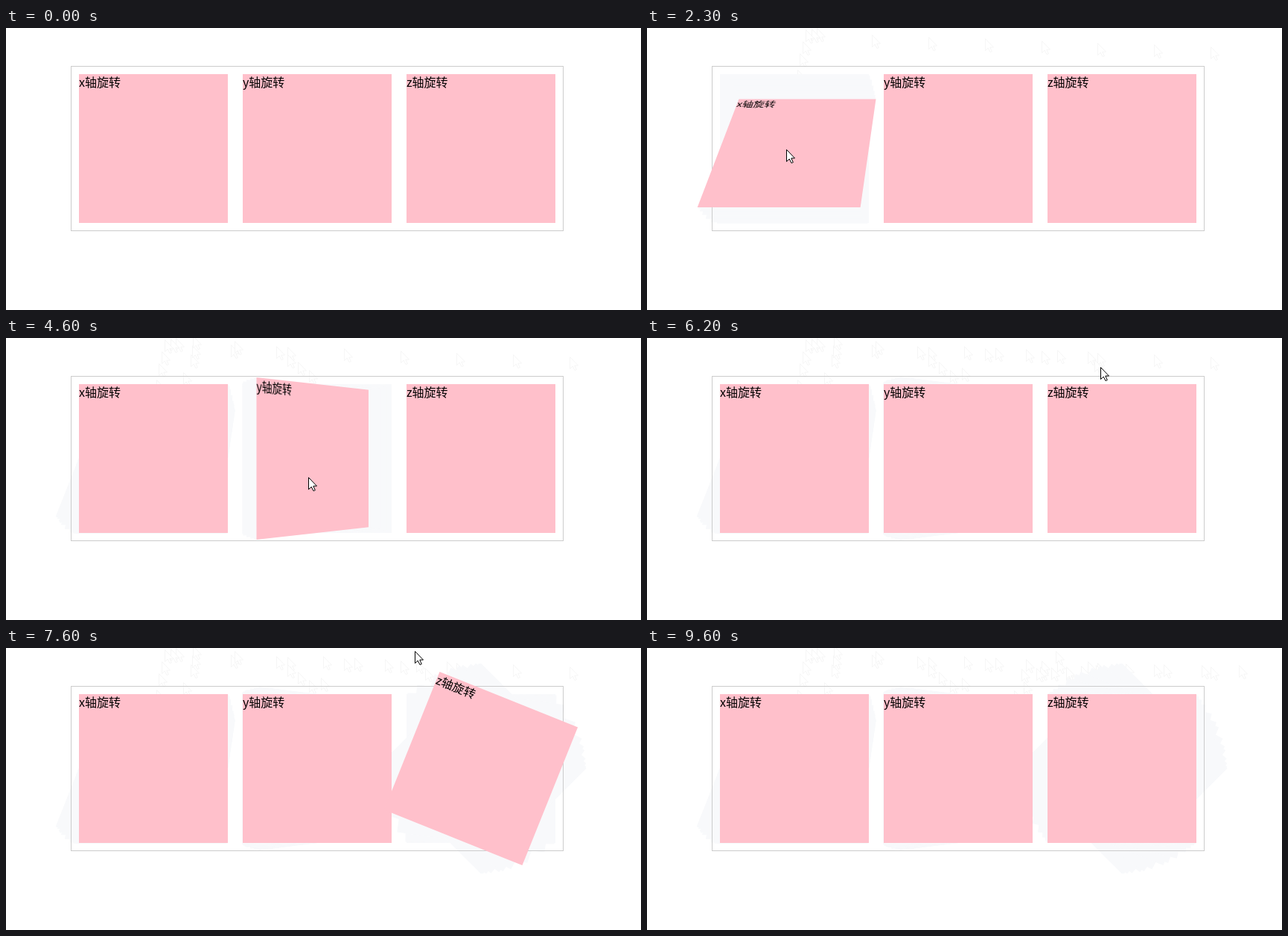
These frames come from a looping animation (853 by 379 pixels, 9900 ms). An HTML page:

```html
<!DOCTYPE html>
<html lang="zh-CN">
<head>
<meta charset="utf-8">
<title>3D rotation</title>
<style>
  html, body { margin: 0; width: 100%; height: 100%; overflow: hidden; background: #fff; }
  #stage { position: relative; width: 853px; height: 379px; overflow: hidden; }
  .box {
    position: absolute; left: 87px; top: 51px; width: 660px; height: 220px;
    border: 1px solid transparent; perspective: 800px;
  }
  #panels { border-color: #ccc; }
  .panel {
    position: absolute; top: 10px; width: 200px; height: 200px; background: pink;
    font: 16px/20px "Noto Sans CJK SC", "Noto Sans CJK", sans-serif; color: #000;
  }
  .faint { background: #f8f9fb; }
  .arrow { position: absolute; left: 0; top: 0; width: 12px; height: 19px; overflow: visible; }
  .arrow path { fill: #fff; stroke: #000; }
  .arrow.faint { background: none; }
  .arrow.faint path { stroke: #f6f6f6; }
</style>
</head>
<body>
<div id="stage">
  <div id="arrows"></div>
  <div id="shades" class="box"></div>
  <div id="panels" class="box"></div>
</div>
<script>
const LOOP = 9900, STEP = 100, TURN = 900, ANGLE = 45;
const SHOW = 300, HIDE = 9600;

// hover intervals [enter, leave] per axis
const axes = [
  { name: 'x', hovers: [[1590, 2870]] },
  { name: 'y', hovers: [[4000, 5330], [7880, 8400]] },
  { name: 'z', hovers: [[6270, 7330]] }
];

// turning points of the pointer: [time, x, y]
const path = [
  [SHOW, 757, 25], [900, 302, 9], [1000, 228, 0], [1200, 213, 2], [1400, 205, 34],
  [2000, 187, 163], [2600, 187, 163],
  [3200, 248, 22], [3400, 251, -3], [3600, 363, 11], [3900, 407, 43],
  [4500, 406, 187], [5000, 406, 187],
  [5600, 426, 11], [6000, 592, 18], [6200, 609, 39],
  [6600, 620, 120], [7100, 618, 120],
  [7600, 549, 4], [7900, 485, 66], [8300, 482, 85],
  [8500, 503, 28], [9200, 643, 21], [HIDE, 846, 24]
];

const $ = id => document.getElementById(id);

// CSS "ease": cubic-bezier(.25, .1, .25, 1)
function ease(x) {
  if (x <= 0) return 0;
  if (x >= 1) return 1;
  const curve = (u, a, b) => 3 * u * (1 - u) * (1 - u) * a + 3 * u * u * (1 - u) * b + u * u * u;
  let lo = 0, hi = 1;
  for (let i = 0; i < 24; i++) {
    const mid = (lo + hi) / 2;
    if (curve(mid, .25, .25) < x) lo = mid; else hi = mid;
  }
  return curve(lo, .1, 1);
}

// a turn cut short also takes less time to go back
function angleAt(axis, t) {
  const hover = axis.hovers.filter(h => h[0] <= t).pop();
  if (!hover) return 0;
  const [enter, leave] = hover;
  if (t < leave) return ANGLE * ease((t - enter) / TURN);
  const peak = ease((leave - enter) / TURN);
  return ANGLE * peak * (1 - ease((t - leave) / (TURN * peak)));
}

function pointerAt(t) {
  const i = Math.max(1, path.findIndex(p => p[0] >= t));
  const [t0, x0, y0] = path[i - 1], [t1, x1, y1] = path[i];
  const k = (t - t0) / (t1 - t0);
  return [Math.round(x0 + (x1 - x0) * k), Math.round(y0 + (y1 - y0) * k)];
}

function addPanel(parent, index, cls) {
  const el = document.createElement('div');
  el.className = 'panel ' + cls;
  el.style.left = 10 + 220 * index + 'px';
  return parent.appendChild(el);
}

function addArrow(parent, cls) {
  parent.insertAdjacentHTML('beforeend',
    `<svg class="arrow ${cls}"><path d="M.5.5V16.5L4.2 13 7 18.5 9.3 17.5 6.8 12H11.5Z"/></svg>`);
  return parent.lastElementChild;
}

function turn(el, axis, t) {
  const a = angleAt(axis, t);
  el.style.transform = a ? `rotate${axis.name.toUpperCase()}(${a}deg)` : 'none';
}

function place(el, t) {
  const [x, y] = pointerAt(t);
  el.style.transform = `translate(${x}px, ${y}px)`;
}

axes.forEach((axis, i) => {
  axis.el = addPanel($('panels'), i, '');
  axis.el.textContent = axis.name + '轴旋转';
});
const pointer = addArrow($('stage'), '');

// faint marks stay behind wherever something has moved away
const marks = [];
for (let t = SHOW; t < HIDE; t += STEP) {
  if (String(pointerAt(t)) !== String(pointerAt(t + STEP))) {
    const el = addArrow($('arrows'), 'faint');
    place(el, t);
    marks.push({ el, t });
  }
  axes.forEach((axis, i) => {
    if (angleAt(axis, t) === angleAt(axis, t + STEP)) return;
    const el = addPanel($('shades'), i, 'faint');
    turn(el, axis, t);
    marks.push({ el, t });
  });
}

let shown = -1;
function draw(now) {
  const t = Math.floor(now % LOOP / STEP) * STEP;
  if (t === shown) return;
  shown = t;
  axes.forEach(axis => turn(axis.el, axis, t));
  const visible = t >= SHOW && t < HIDE;
  pointer.style.display = visible ? '' : 'none';
  if (visible) place(pointer, t);
  for (const m of marks) m.el.style.display = m.t < t ? '' : 'none';
}

const start = performance.now();
function tick() {
  draw(performance.now() - start);
  requestAnimationFrame(tick);
}
tick();
</script>
</body>
</html>
```
